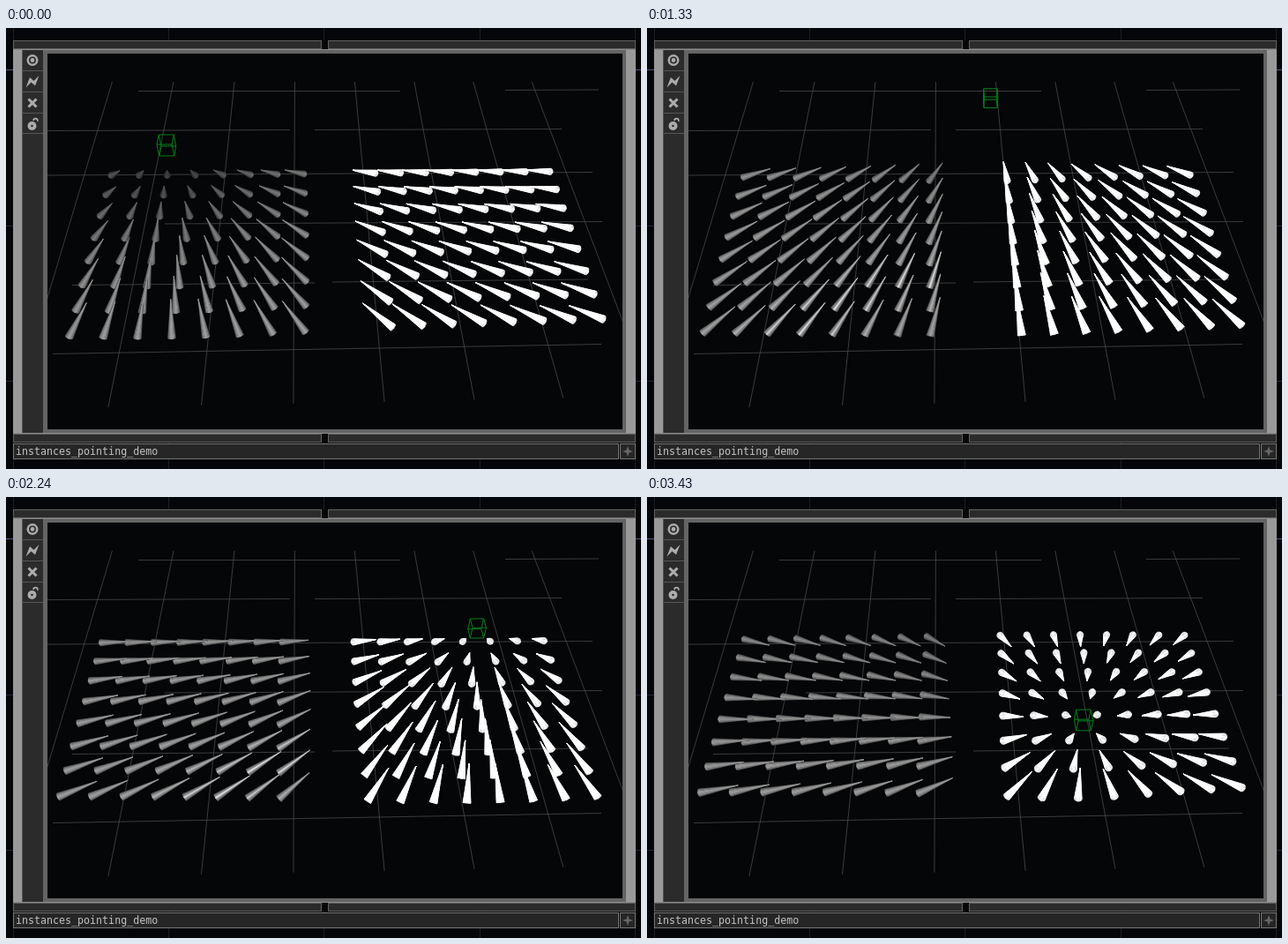
These frames come from a looping animation (720 px wide and 500 px high, 3500 ms). An HTML page with a canvas:

```html
<!DOCTYPE html>
<html lang="en">
<head>
<meta charset="utf-8">
<title>instances_pointing_demo</title>
<style>
html, body { margin: 0; width: 100%; height: 100%; overflow: hidden; background: #050609; }
canvas { display: block; }
</style>
</head>
<body>
<canvas id="stage" width="720" height="500"></canvas>
<script>
const ctx = document.getElementById('stage').getContext('2d');
const LOOP = 3500, STEP = 70;

// Camera: focal length, view centre, world axes and origin in camera space
const F = 787, CX = 373, CY = 242, UNIT = 0.0994;
const AX = [0.999, -0.010, 0.0443];
const AY = [0.0264, -0.667, -0.745];
const AZ = [0.036, 0.7455, -0.666];
const ORIGIN = [-46 / F, -77 / F, 1];

const CONE_LEN = 0.48 * UNIT, CONE_R = 0.048 * UNIT, FACETS = 18;
const SPACING = 0.367, CUBE = 0.17;

// Target path: time, screen x, screen y, depth
const PATH = [
  [0, 182, 133, 0.79], [400, 228, 162, 0.885], [560, 249, 159, 0.92],
  [910, 309, 106, 0.857], [1190, 362, 73, 0.865], [1680, 456, 132, 0.89],
  [2020, 506, 161, 0.88], [2240, 534, 149, 0.86], [2500, 558, 128, 0.83],
  [2730, 571, 144, 0.81], [2800, 572, 155, 0.806], [3430, 495, 253, 0.79]
];

const add = (a, b, k = 1) => [a[0] + b[0] * k, a[1] + b[1] * k, a[2] + b[2] * k];
const dot = (a, b) => a[0] * b[0] + a[1] * b[1] + a[2] * b[2];
const cross = (a, b) => [
  a[1] * b[2] - a[2] * b[1], a[2] * b[0] - a[0] * b[2], a[0] * b[1] - a[1] * b[0]
];
const scale = (a, k) => [a[0] * k, a[1] * k, a[2] * k];
const unit = a => scale(a, 1 / (Math.hypot(...a) || 1));
const project = p => [CX + F * p[0] / p[2], CY + F * p[1] / p[2]];
const world = (x, y, z, from = ORIGIN) =>
  add(add(add(from, AX, x * UNIT), AY, y * UNIT), AZ, z * UNIT);

function slope(i, c) {
  const a = PATH[i - 1], b = PATH[i], d = PATH[i + 1];
  if (!a) return (d[c] - b[c]) / (d[0] - b[0]);
  if (!d) return (b[c] - a[c]) / (b[0] - a[0]);
  const h = b[0] - a[0], k = d[0] - b[0];
  return ((b[c] - a[c]) / h * k + (d[c] - b[c]) / k * h) / (h + k);
}

function targetAt(t) {
  let i = 0;
  while (i < PATH.length - 2 && t > PATH[i + 1][0]) i++;
  const a = PATH[i], b = PATH[i + 1], h = b[0] - a[0], s = (t - a[0]) / h;
  const [x, y, w] = [1, 2, 3].map(c =>
    (1 + 2 * s) * (1 - s) ** 2 * a[c] + s * s * (3 - 2 * s) * b[c] +
    h * s * (1 - s) * ((1 - s) * slope(i, c) - s * slope(i + 1, c)));
  return [(x - CX) / F * w, (y - CY) / F * w, w];
}

function poly(points, color) {
  ctx.beginPath();
  for (const p of points) ctx.lineTo(...project(p));
  ctx.closePath();
  ctx.fillStyle = ctx.strokeStyle = color;
  ctx.lineWidth = 0.25;
  ctx.fill();
  ctx.stroke();
}

function line(x1, y1, x2, y2, color, width = 1) {
  ctx.strokeStyle = color;
  ctx.lineWidth = width;
  ctx.beginPath();
  ctx.moveTo(x1, y1);
  ctx.lineTo(x2, y2);
  ctx.stroke();
}

function shade(normal, view) {
  const d = Math.max(0, dot(normal, view));
  const v = Math.min(255, Math.round(22 + 138 * d ** 0.8 + 60 * d ** 500));
  return `rgb(${v},${v},${v})`;
}

function cone(pos, target, lit) {
  const axis = unit(add(target, pos, -1));
  const view = unit(scale(pos, -1));
  const e1 = unit(add(view, axis, -dot(view, axis)));
  const e2 = cross(axis, e1);
  const tip = add(pos, axis, CONE_LEN / 2);
  const base = add(pos, axis, -CONE_LEN / 2);
  const radial = a => add(scale(e1, Math.cos(a)), e2, Math.sin(a));
  const rim = a => add(base, radial(a), CONE_R);
  const step = 2 * Math.PI / FACETS;

  // Facets from the far side round to the one facing the viewer
  for (let k = FACETS / 2; k >= 0; k--) {
    for (const a of [k * step, -k * step]) {
      const n = unit(add(radial(a), axis, CONE_R / CONE_LEN));
      poly([tip, rim(a - step / 2), rim(a + step / 2)], lit ? shade(n, view) : '#fff');
    }
  }
  if (dot(axis, view) < 0) {
    const ring = Array.from({ length: FACETS }, (_, k) => rim(k * step));
    poly(ring, lit ? shade(scale(axis, -1), view) : '#fff');
  }
}

const cones = [];
for (const [x0, lit] of [[-2.565, true], [1.02, false]])
  for (let r = 0; r < 8; r++)
    for (let c = 0; c < 8; c++)
      cones.push({ pos: world(x0 + c * SPACING, 0, -0.03 + r * SPACING), lit });

function floor() {
  const color = '#484a4a';
  for (let x = -3; x <= 4; x++)
    line(...project(world(x, 0, -2.245)), ...project(world(x, 0, 3.7)), color, 0.8);
  for (const s of [
    [150, 71.5, 447, 71.5], [566, 70.5, 672, 70],
    [46, 116.5, 322, 115.5], [350, 115.5, 630, 114.5],
    [46, 167, 665, 163.5], [180, 222, 676, 219.5],
    [75, 291.5, 350, 289], [370, 288, 660, 285],
    [53, 369.5, 675, 358.5]
  ]) line(...s, color, 0.8);
}

function cube(center) {
  const h = CUBE / 2, s = [-h, h];
  const edge = (a, b) =>
    line(...project(world(...a, center)), ...project(world(...b, center)), '#06801a');
  for (const p of s) for (const q of s) {
    edge([-h, p, q], [h, p, q]);
    edge([p, -h, q], [p, h, q]);
    edge([p, q, -h], [p, q, h]);
  }
}

function box(x, y, w, h, fill, border) {
  ctx.fillStyle = fill;
  ctx.fillRect(x, y, w, h);
  if (!border) return;
  ctx.strokeStyle = border;
  ctx.lineWidth = 1;
  ctx.strokeRect(x + 0.5, y + 0.5, w - 1, h - 1);
}

function shape(points, color) {
  ctx.fillStyle = color;
  ctx.beginPath();
  for (const p of points) ctx.lineTo(...p);
  ctx.fill();
}

function disc(x, y, r, color) {
  ctx.fillStyle = color;
  ctx.beginPath();
  ctx.arc(x, y, r, 0, 7);
  ctx.fill();
}

function icons() {
  const c = '#acacac', bg = '#2b2b2b';
  for (const y of [48, 72, 96, 119]) line(19, y + 0.5, 42, y + 0.5, '#555');
  disc(30, 36.5, 6.5, c);
  disc(30, 36.5, 4, bg);
  disc(30, 36.5, 2.4, c);

  shape([[22.5, 67.5], [27, 56], [31.5, 60], [37.5, 54], [33, 65.5], [28.5, 61.5]], c);

  line(25.5, 80.5, 34.5, 89.5, c, 3);
  line(34.5, 80.5, 25.5, 89.5, c, 3);

  disc(29.5, 111, 5, c);
  disc(29.5, 111, 1.3, bg);
  ctx.strokeStyle = c;
  ctx.lineWidth = 1.6;
  ctx.beginPath();
  ctx.arc(33.5, 105, 2.4, Math.PI, 0.4);
  ctx.stroke();
}

function frame() {
  box(0, 0, 720, 500, '#050609');
  for (const x of [184.5, 360.5, 537.5]) line(x, 0, x, 500, '#1d1d25');
  for (const y of [224.5, 400.5]) line(0, y, 720, y, '#24243a');
  line(0, 47.5, 720, 47.5, '#54547e');
  for (const x of [8.5, 713.5]) line(x, 0, x, 500, '#1d1d25');

  for (const y of [14, 460]) {
    box(8, y, 350, 10, '#2b2b2b', '#626262');
    box(358, y, 7, 10, '#08080b');
    box(365, y, 349, 10, '#2b2b2b', '#626262');
  }
  box(8, 24, 706, 436, '#999');
  box(18, 24, 25, 436, '#2b2b2b');
  line(18.5, 24, 18.5, 460, '#555');
  box(42, 24, 661, 436, '#646464');
  for (const y of [24.5, 459.5]) line(8, y, 714, y, '#8c8c8c');
  box(47, 29, 652, 426, '#040608');
  icons();

  box(8, 471, 687, 18, '#262626', '#777');
  box(696, 471, 18, 18, '#262626', '#777');
  shape([[705, 474], [706.5, 478.5], [711, 480], [706.5, 481.5],
         [705, 486], [703.5, 481.5], [699, 480], [703.5, 478.5]], '#666');
  ctx.fillStyle = '#c4c4c4';
  ctx.font = '11.65px "DejaVu Sans Mono", monospace';
  ctx.fillText('instances_pointing_demo', 11, 484);
}

function draw(t) {
  const target = targetAt(t);
  frame();
  ctx.save();
  ctx.beginPath();
  ctx.rect(47, 29, 652, 426);
  ctx.clip();
  floor();
  const far = c => Math.hypot(...add(c.pos, target, -1));
  for (const c of [...cones].sort((a, b) => far(a) - far(b))) cone(c.pos, target, c.lit);
  cube(target);
  ctx.restore();
}

let last = -1;
function tick() {
  const t = Math.floor(performance.now() % LOOP / STEP) * STEP;
  if (t !== last) draw(last = t);
  requestAnimationFrame(tick);
}
tick();
</script>
</body>
</html>
```
